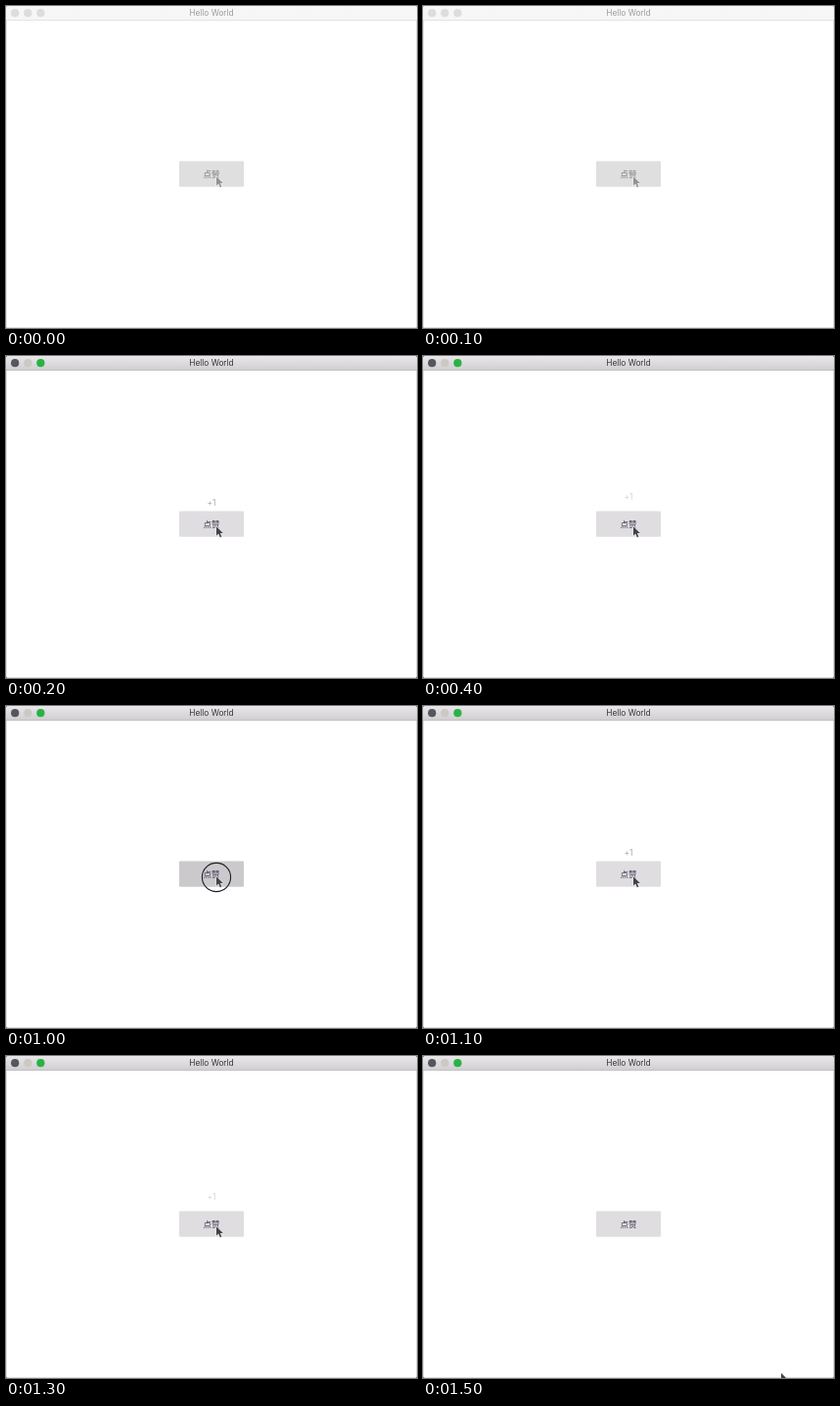
These frames come from a looping animation (420 by 329 pixels, 1600 ms). An HTML page with a canvas:

```html
<!DOCTYPE html>
<html lang="zh-CN">
<head>
<meta charset="utf-8">
<title>Hello World</title>
<style>
html, body { margin: 0; width: 100%; height: 100%; overflow: hidden; background: #fff; }
canvas { display: block; width: 420px; height: 329px; }
</style>
</head>
<body>
<canvas id="stage"></canvas>
<script>
const W = 420, H = 329, LOOP = 1600, STEP = 100;
const canvas = document.getElementById('stage');
const scale = window.devicePixelRatio || 1;
canvas.width = W * scale;
canvas.height = H * scale;
const ctx = canvas.getContext('2d');

const ACTIVE = {
  corner: '#66666a', edge: '#dedede', top: '#e9e7e9', bottom: '#d1cfd1', line: '#b3b1b3',
  title: '#353538', lights: ['#55565e', '#cdc9c2', '#27b445'],
  button: '#dfdde0', label: '#3c3b50', cursor: '#424247', rim: '#e9e8ea'
};
const INACTIVE = {
  corner: '#b8b8b8', edge: '#e2e2e2', top: '#f7f7f7', bottom: '#f6f6f6', line: '#dddddd',
  title: '#9c9c9c', lights: ['#dddddd', '#dddddd', '#dddddd'],
  button: '#dfdfdf', label: '#9b9b9b', cursor: '#929292', rim: '#eeeeee'
};

function text(str, x, y, size, color, family, weight = 400) {
  ctx.font = `${weight} ${size}px ${family}`;
  ctx.fillStyle = color;
  ctx.textAlign = 'center';
  ctx.textBaseline = 'alphabetic';
  ctx.fillText(str, x, y);
}

function disc(x, y, r, color) {
  ctx.beginPath();
  ctx.arc(x, y, r, 0, Math.PI * 2);
  ctx.fillStyle = color;
  ctx.fill();
}

function drawWindow(c) {
  ctx.fillStyle = c.corner;
  ctx.fillRect(0, 0, W, H);
  ctx.save();
  ctx.beginPath();
  ctx.roundRect(0, 0, W, H, 3);
  ctx.clip();
  ctx.fillStyle = '#fff';
  ctx.fillRect(0, 0, W, H);
  ctx.strokeStyle = c.edge;
  ctx.lineWidth = 1;
  ctx.strokeRect(0.5, 0.5, W - 1, H - 1);
  const bar = ctx.createLinearGradient(0, 0, 0, 14);
  bar.addColorStop(0, c.top);
  bar.addColorStop(1, c.bottom);
  ctx.fillStyle = bar;
  ctx.fillRect(0, 0, W, 14);
  ctx.fillStyle = c.line;
  ctx.fillRect(0, 14, W, 0.8);
  ctx.restore();
  c.lights.forEach((color, i) => disc(9.2 + i * 13.1, 7.2, 4.1, color));
  text('Hello World', 210, 10.4, 8.3, c.title, 'Inter, sans-serif');
}

function drawButton(c, pressed) {
  ctx.fillStyle = pressed ? '#cbc9cc' : c.button;
  ctx.beginPath();
  ctx.roundRect(177, 158.4, 66, 26.4, 1);
  ctx.fill();
  text('点赞', 210, 174.7, 8.5, c.label, '"Noto Sans CJK SC", "Noto Sans CJK", sans-serif',
    c === INACTIVE ? 700 : 400);
}

function drawCursor(c, x, y) {
  const points = [[0, 0], [0, 9.4], [2.2, 7.4], [3.8, 11], [5.3, 10.3], [3.8, 6.9], [6.8, 6.7]];
  ctx.beginPath();
  points.forEach(([px, py]) => ctx.lineTo(x + px, y + py));
  ctx.closePath();
  ctx.lineJoin = 'round';
  ctx.lineWidth = 1.2;
  ctx.strokeStyle = c.rim;
  ctx.stroke();
  ctx.fillStyle = c.cursor;
  ctx.fill();
}

// The counter rises from the button and fades away
function drawPlus(age) {
  ctx.globalAlpha = 1 - age / 400;
  text('+1', 210, 153.2 - age * 0.03, 8.3, '#a5a5a8', 'Inter, sans-serif');
  ctx.globalAlpha = 1;
}

function drawClick() {
  ctx.beginPath();
  ctx.arc(215, 175, 14.6, 0, Math.PI * 2);
  ctx.lineWidth = 1.1;
  ctx.strokeStyle = '#1e1e22';
  ctx.stroke();
}

function draw(t) {
  const c = t < 200 ? INACTIVE : ACTIVE;
  const pressed = t >= 1000 && t < 1100;
  drawWindow(c);
  drawButton(c, pressed);
  for (const start of [200, 1100]) {
    if (t >= start && t < start + 400) drawPlus(t - start);
  }
  if (pressed) drawClick();
  const leave = Math.max(0, Math.min(1, (t - 1300) / 200));
  const k = leave * leave;
  drawCursor(c, 215 + 151 * k, 174.2 + 149.8 * k);
}

function frame(now) {
  const t = Math.floor((now % LOOP) / STEP) * STEP;
  ctx.setTransform(scale, 0, 0, scale, 0, 0);
  draw(t);
  requestAnimationFrame(frame);
}
frame(0);
</script>
</body>
</html>
```
